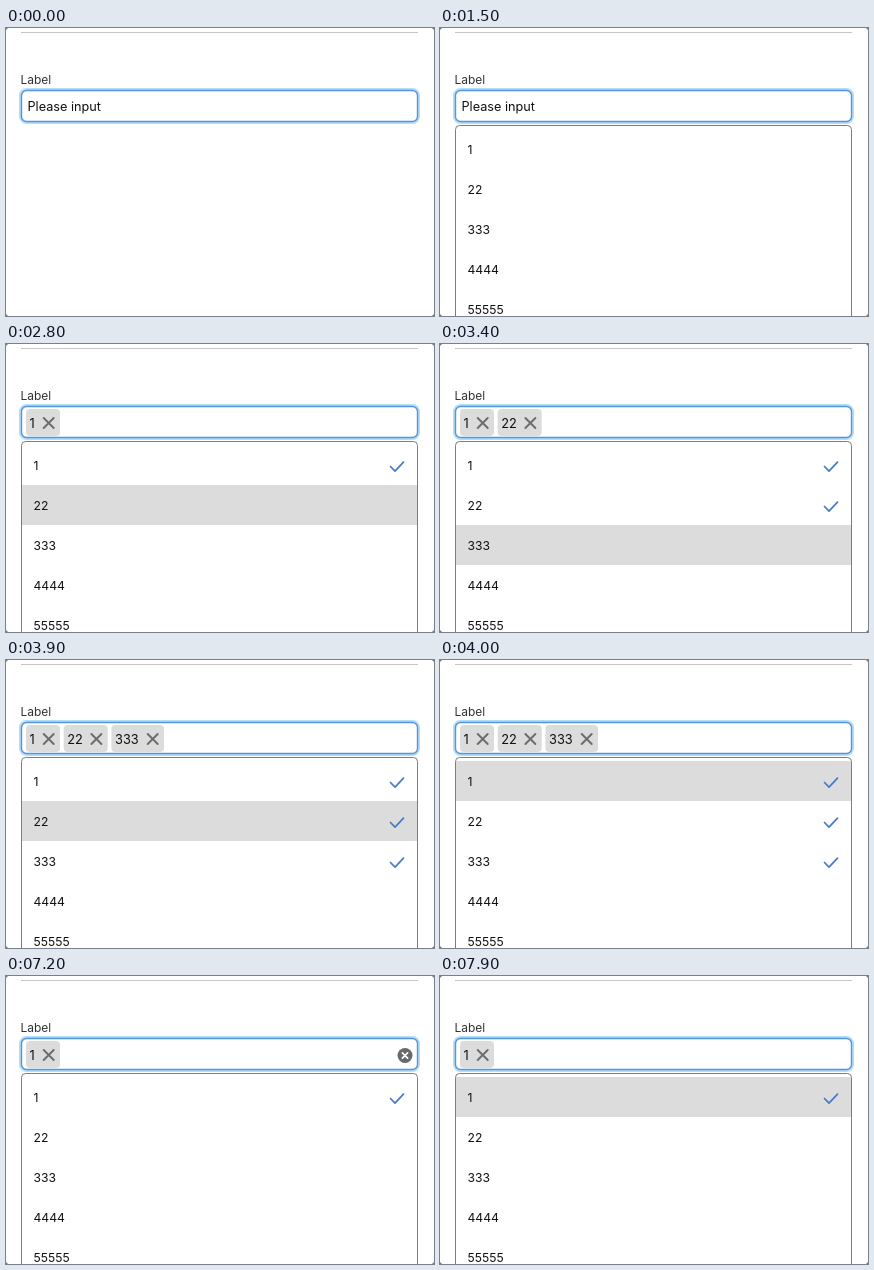
Recreate the animation shown at these times as an HTML page. Size 428 px wide and 288 px high, loop 8000 ms.

```html
<!DOCTYPE html>
<html lang="en">
<head>
<meta charset="utf-8">
<title>Multi select</title>
<style>
  html, body { margin: 0; width: 100%; height: 100%; overflow: hidden; background: #fff; }
  svg { display: block; font: 12.2px Inter, Roboto, sans-serif; }
  .mark { fill: none; stroke-linecap: round; stroke-linejoin: round; }
</style>
</head>
<body>
<svg id="stage" width="428" height="288" viewBox="0 0 428 288"></svg>
<script>
const stage = document.getElementById('stage');
const options = ['1', '22', '333', '4444', '55555'];
const LOOP = 8000;

// Each step changes only the listed parts of the state.
const steps = [
  [0, { open: false, hover: -1, picked: [], clear: false }],
  [1500, { open: true }],
  [2000, { hover: 0 }],
  [2400, { picked: [0] }],
  [2800, { hover: 1 }],
  [3100, { picked: [0, 1] }],
  [3400, { hover: 2 }],
  [3700, { picked: [0, 1, 2] }],
  [3900, { hover: 1 }],
  [4000, { hover: 0 }],
  [4100, { hover: -1 }],
  [4200, { clear: true }],
  [5000, { picked: [0, 2] }],
  [7200, { picked: [0] }],
  [7900, { hover: 0, clear: false }]
];

const rect = (x, y, w, h, attrs) => `<rect x="${x}" y="${y}" width="${w}" height="${h}" ${attrs}/>`;
const text = (x, y, str, size = 12.2, fill = '#111') =>
  `<text x="${x}" y="${y}" font-size="${size}" fill="${fill}">${str}</text>`;
const cross = (x, y, r, color, width) =>
  `<path class="mark" d="M${x - r} ${y - r}l${2 * r} ${2 * r}m0 ${-2 * r}l${-2 * r} ${2 * r}" stroke="${color}" stroke-width="${width}"/>`;

function frame() {
  return '<path d="M15 4.5H412" stroke="#c6c6c6"/>' +
    text(14.4, 56, 'Label', 12, '#333') +
    rect(14.5, 61.5, 398, 33, 'rx="6" fill="none" stroke="#b5dcf8" stroke-width="3"') +
    rect(15.5, 62.5, 396, 31, 'rx="5" fill="#fff" stroke="#5596d8" stroke-width="1.4"');
}

function chips(picked) {
  let x = 20;
  return picked.map(i => {
    const width = [34, 44, 52.6][i];
    const chip = rect(x, 65, width, 27, 'rx="4" fill="#dcdcdc"') +
      text(x + 3.6, 83.5, options[i], 12.8) +
      cross(x + width - 11.3, 79, 5, '#6c6c6c', 1.9);
    x += width + 3.7;
    return chip;
  }).join('');
}

function list({ hover, picked }) {
  const rows = options.map((label, i) => {
    const y = 101 + 40 * i;
    return (i === hover ? rect(16, y, 395, 40, 'fill="#dcdcdc"') : '') +
      text(27.5, y + 25, label) +
      (picked.includes(i)
        ? `<path class="mark" d="M384.5 ${y + 21.5}l4.5 4.7 8.5-9" stroke="#477bc8" stroke-width="1.7"/>` : '');
  });
  return rect(15.5, 97.5, 396, 210, 'rx="4" fill="#fff" stroke="#7d7d7d"') + rows.join('');
}

function render(state) {
  stage.innerHTML = frame() +
    (state.picked.length ? chips(state.picked) : text(21.5, 83, 'Please input', 12.7)) +
    (state.clear ? '<circle cx="399" cy="79.5" r="7.5" fill="#696969"/>' + cross(399, 79.5, 2.6, '#fff', 1.7) : '') +
    (state.open ? list(state) : '') +
    '<path d="M0 0h2L0 2zM428 0v2l-2-2zM0 288v-2l2 2zM428 288h-2l2-2z" fill="#777"/>';
}

let shown = -1;
function tick() {
  const time = performance.now() % LOOP;
  const past = steps.filter(([at]) => at <= time);
  if (past.length !== shown) {
    shown = past.length;
    render(Object.assign({}, ...past.map(([, change]) => change)));
  }
  requestAnimationFrame(tick);
}
tick();
</script>
</body>
</html>
```
